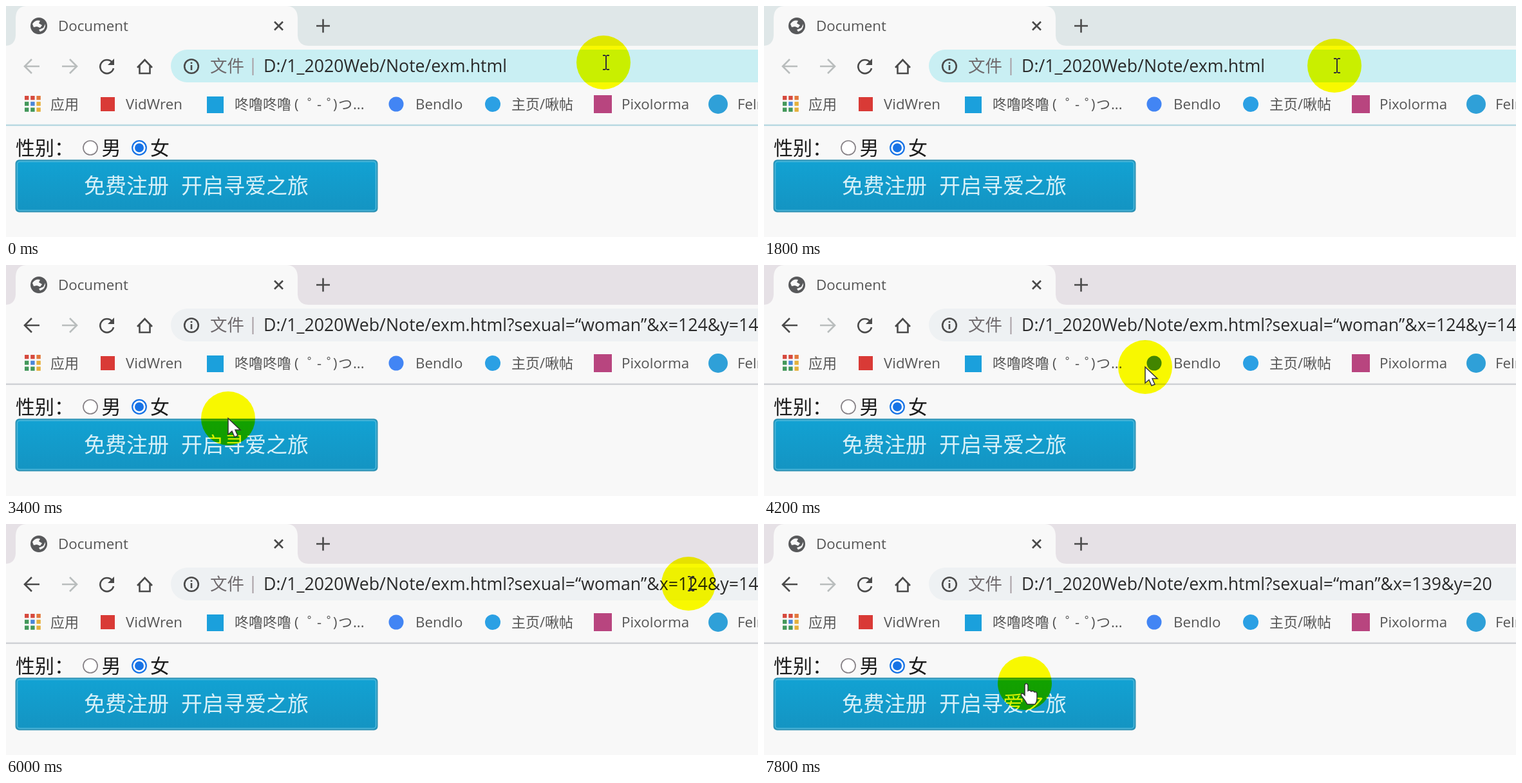
Recreate the animation shown at these times as an HTML page. Size 1168 by 360 pixels, loop 8 s.

```html
<!DOCTYPE html>
<html lang="zh-CN">
<head>
<meta charset="utf-8">
<title>Document</title>
<style>
  html, body { margin: 0; width: 100%; height: 100%; overflow: hidden; background: #f8f8f8; }
  svg { display: block; width: 100%; height: 100%; --strip: #e6e1e6; --pill: #eef1f3; --rule: #d0d2d6; --back: #4a4a4a; }
  svg.fresh { --strip: #dfe7e8; --pill: #c9eff3; --rule: #b9d9e2; --back: #b9bdbd; }
  text { font-family: 'Open Sans', 'Noto Sans CJK SC', 'Noto Sans CJK', sans-serif; white-space: pre; }
  .small { font-size: 22.3px; fill: #555; }
  .cjk { font-size: 22px; fill: #555; }
  .page { font-size: 30px; fill: #1c1c1c; }
  .line { fill: none; stroke: #4a4a4a; stroke-width: 2.6; }
  #halo { mix-blend-mode: multiply; }
</style>
</head>
<body>
<svg id="stage" viewBox="0 0 1168 360">
  <defs>
    <linearGradient id="blue" x2="0" y2="1">
      <stop stop-color="#12a2d3"/><stop offset="1" stop-color="#1494c2"/>
    </linearGradient>
  </defs>
  <rect width="1168" height="360" fill="#f8f8f8"/>

  <!-- Tab strip -->
  <rect width="1168" height="62" fill="var(--strip)"/>
  <path d="M0 62Q14 61 15 46V18Q16 1 31 0H437Q452 1 453 18V46Q454 61 469 62Z" fill="#f8f8f8"/>
  <circle cx="51" cy="31" r="13" fill="#58595b"/>
  <path d="M41 28q5-7 12-5l-2 4 5 3-3 4-5-2-5 1zM51 37l7-3 3-6q1 9-8 12z" fill="#f8f8f8"/>
  <text class="small" x="81" y="39">Document</text>
  <path class="line" d="M417 24.500l13 13m0-13l-13 13"/>
  <path class="line" d="M482 31h21M492.500 20.500v21" stroke-width="3"/>

  <!-- Toolbar -->
  <path class="line" style="stroke:var(--back)" d="M52 94H30M40 83L29 94l11 11"/>
  <path class="line" style="stroke:#b9bdbd" d="M87 94h22M99 83l11 11-11 11"/>
  <path class="line" d="M165 88A10.500 10.500 0 1 0 167 97"/>
  <path d="M168 82v10h-10z" fill="#4a4a4a"/>
  <path class="line" d="M204 96l11.500-12L227 96M207.500 93v12h16V93"/>
  <rect x="256" y="68" width="960" height="51" rx="25.500" fill="var(--pill)"/>
  <circle class="line" cx="288" cy="94" r="10.800" stroke-width="2.200"/>
  <path class="line" d="M288 92v8M288 87.500v2.600"/>
  <text x="317" y="103" font-size="26.500" fill="#6f6a6d">文件</text>
  <path d="M383.500 81v27" stroke="#a99fa4" stroke-width="2"/>
  <text id="url" x="400" y="102.500" font-size="26.700" fill="#2a2a2a"></text>

  <!-- Bookmarks -->
  <g id="apps"></g>
  <text class="cjk" x="69" y="161">应用</text>
  <rect x="147" y="142" width="22" height="22" fill="#d93a36"/>
  <text class="small" x="186" y="161">VidWren</text>
  <rect x="312" y="141" width="26" height="26" fill="#1ba0dc"/>
  <text class="cjk" y="161" x="355 377 399 421 448 468 483 498 508 516 539">咚噜咚噜(゜-゜)つ...</text>
  <circle cx="606" cy="153" r="11.500" fill="#4285f4"/>
  <text class="small" x="636" y="161">Bendlo</text>
  <circle cx="756" cy="153" r="12" fill="#2ba0e4"/>
  <text class="cjk" x="785" y="161">主页/啾帖</text>
  <rect x="913" y="139" width="28" height="28" fill="#b8457f"/>
  <text class="small" x="956" y="161">Pixolorma</text>
  <circle cx="1106" cy="153" r="15" fill="#2fa0d8"/>
  <text class="small" x="1136" y="161">Felmivox</text>
  <rect y="184.500" width="1168" height="2.500" fill="var(--rule)"/>

  <!-- Page -->
  <text class="page" x="15" y="232">性别：</text>
  <g id="radios"></g>
  <text class="page" x="148.500" y="232">男</text>
  <text class="page" x="224" y="232">女</text>
  <rect x="15.500" y="240.500" width="561" height="80" rx="5" fill="url(#blue)" stroke="#3293b4" stroke-width="2"/>
  <rect x="17.500" y="242.500" width="557" height="76" rx="4" fill="none" stroke="#4fb8da" stroke-width="1.500"/>
  <text y="292" font-size="33" fill="#d8f1f8"><tspan x="121">免费注册</tspan><tspan x="272">开启寻爱之旅</tspan></text>

  <!-- Pointer -->
  <circle id="halo" r="42" fill="#ff0"/>
  <g id="pointer">
    <path data-kind="beam" d="M-1-11h4m2 0h4M4-11v22M-1 11h4m2 0h4" fill="none" stroke="#333" stroke-width="2"/>
    <path data-kind="arrow" d="M0 0v25l6-5 4 9 5-2-4-9h8z" fill="#fff" stroke="#333" stroke-width="1.500"/>
    <path data-kind="hand" d="M0 3q2-5 5 0v9q3-2 5 1 3-2 5 1 4-1 4 3v7q0 5-3 9H4Q0 26-5 20q-2-4 2-4l3 3z" fill="#fff" stroke="#333" stroke-width="1.500"/>
  </g>
</svg>
<script>
const LOOP = 8000, STEP = 200;
const SUBMIT_1 = 2600, PICK_MALE = 6600, SUBMIT_2 = 7400;
const PATH = 'D:/1_2020Web/Note/exm.html';

// time, x, y
const WAYPOINTS = [
  [0, 928, 88], [800, 908, 92], [1800, 886, 93], [2400, 362, 280], [2700, 362, 280],
  [3400, 345, 239], [4200, 592, 159], [4800, 930, 94], [5400, 1072, 91],
  [6000, 1060, 93], [6600, 137, 213], [6800, 137, 213],
  [7200, 404, 286], [7400, 404, 286], [7800, 405, 248], [LOOP, 405, 248],
];

const $ = id => document.getElementById(id);
const stage = $('stage'), url = $('url'), halo = $('halo'), pointer = $('pointer');

const appColors = ['#d64a3e', '#d64a3e', '#e2783c', '#43985a', '#4a86d8', '#e5b03b', '#43985a', '#43985a', '#e5b03b'];
$('apps').innerHTML = appColors.map((color, i) =>
  `<rect x="${29 + i % 3 * 9.2}" y="${140 + Math.floor(i / 3) * 9.2}" width="6.4" height="6.4" fill="${color}"/>`).join('');

function radio(x, checked) {
  return checked
    ? `<circle cx="${x}" cy="221" r="10.8" fill="#fff" stroke="#1773e6" stroke-width="2.2"/><circle cx="${x}" cy="221" r="7" fill="#1773e6"/>`
    : `<circle cx="${x}" cy="221" r="11" fill="#fff" stroke="#858085" stroke-width="1.7"/>`;
}

function pointerAt(t) {
  const next = WAYPOINTS.findIndex(p => p[0] > t);
  const [t0, x0, y0] = WAYPOINTS[next - 1], [t1, x1, y1] = WAYPOINTS[next];
  const u = (t - t0) / (t1 - t0), ease = u * u * (3 - 2 * u);
  return [x0 + (x1 - x0) * ease, y0 + (y1 - y0) * ease];
}

function pointerKind(x, y) {
  if (x > 256 && y > 68 && y < 119) return 'beam';
  if (x > 15 && x < 577 && y > 240 && y < 321) return 'hand';
  return 'arrow';
}

function query(t) {
  if (t < SUBMIT_1) return '';
  return t < SUBMIT_2 ? '?sexual=“woman”&x=124&y=14' : '?sexual=“man”&x=139&y=20';
}

function draw(t) {
  const [x, y] = pointerAt(t), kind = pointerKind(x, y);
  const male = t >= PICK_MALE && t < SUBMIT_2;
  stage.classList.toggle('fresh', t < SUBMIT_1);
  url.textContent = PATH + query(t);
  $('radios').innerHTML = radio(131, male) + radio(207, !male);
  halo.setAttribute('transform', `translate(${x} ${y})`);
  pointer.setAttribute('transform', `translate(${x} ${y})`);
  for (const shape of pointer.children) {
    shape.style.display = shape.dataset.kind === kind ? '' : 'none';
  }
}

const start = performance.now();
function tick() {
  const t = (performance.now() - start) % LOOP;
  draw(Math.floor(t / STEP) * STEP);
  requestAnimationFrame(tick);
}
tick();
</script>
</body>
</html>
```
